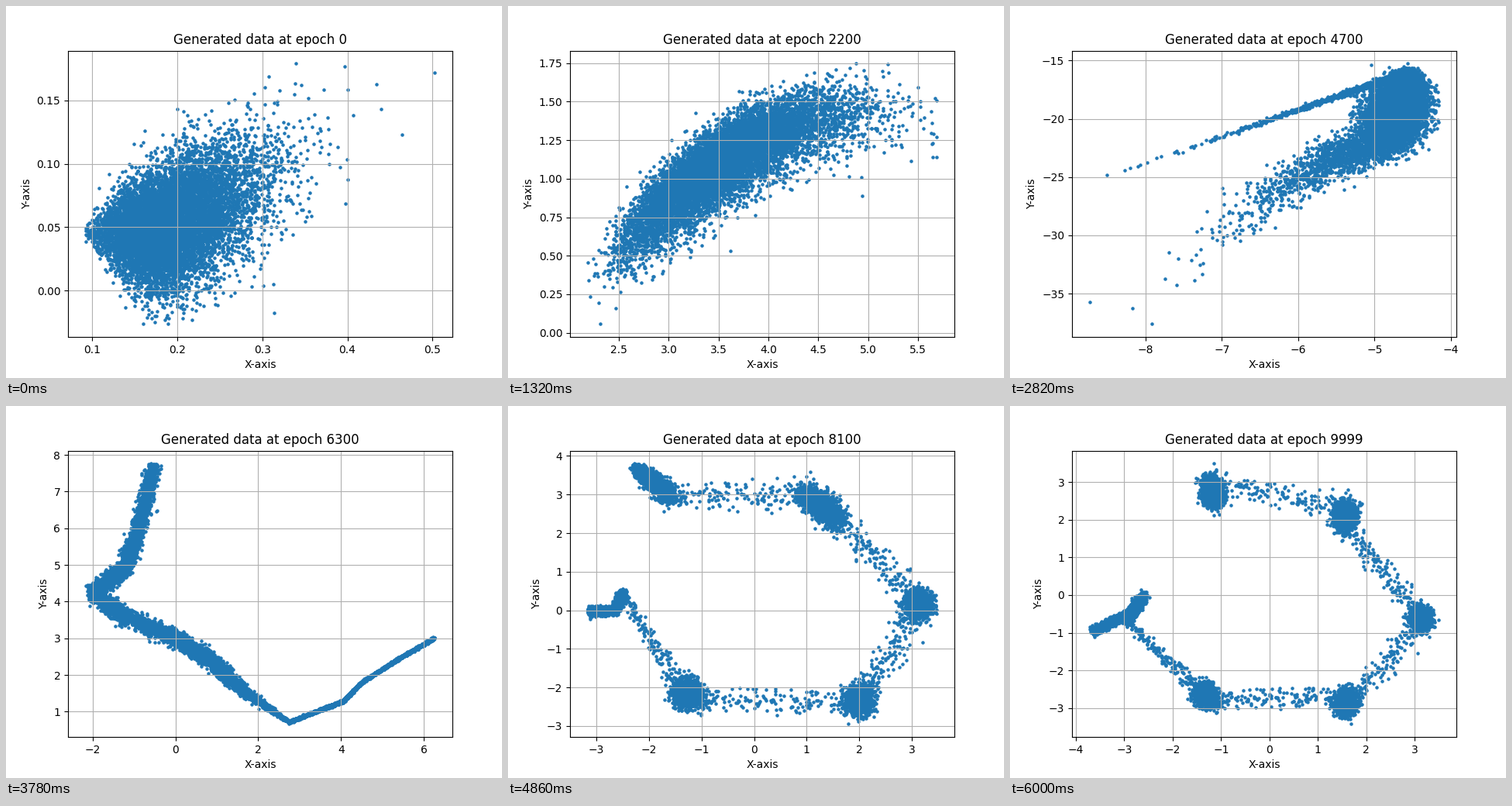
A matplotlib script for the animation above (6060 ms loop, 640 by 480 pixels).

```python
import numpy as np
import matplotlib.pyplot as plt
from matplotlib.animation import FuncAnimation

FRAMES = 101
COUNT = 10000

# Every point keeps its place along the shape (share, rank) and its jitter.
rng = np.random.default_rng(7)
share = (np.arange(COUNT) + 0.5) / COUNT
rank = np.sort(rng.normal(size=COUNT))
jx, jy = rng.normal(size=(2, COUNT))


def fit(x, y, x_range, y_range):
    """Fold stray points back so the data spans exactly the given ranges."""
    pts = np.column_stack([x, y])
    for col, (lo, hi) in zip(pts.T, (x_range, y_range)):
        col[:] = hi - abs(hi - (lo + abs(col - lo)))
        col[col.argmin()], col[col.argmax()] = lo, hi
    return pts


def blob():
    x = 0.189 * np.exp(0.235 * rank)
    spread = 0.028 * (1 - np.exp(-np.maximum(x - 0.09, 0.005) / 0.05))
    y = 0.046 + 0.32 * np.maximum(x - 0.18, 0) + spread * jy
    return fit(x + 0.005 * jx, y, (0.0923, 0.5028), (-0.0264, 0.179))


def streak():
    x = 6.8 + 0.62 * rank + 0.045 * rank ** 2
    y = 5.05 + 0.75 * (x - 6.95) + (0.045 + 0.03 * (x - 5.15)) * jy
    return fit(x, y, (5.149, 9.789), (3.568, 7.048))


def banana():
    x = 0.55 + 0.47 * rank + 0.05 * rank ** 2
    sag = jy - 0.06 * (jy ** 2 - 1)
    y = -2.38 - 0.3 * (x - 0.55) ** 2 + (0.17 - 0.035 * x) * sag
    return fit(x + 0.05 * jx, y, (-0.523, 2.483), (-4.132, -1.884))


def wedge():
    upper = 1.6 * np.maximum(-rank - 1.2, 0)
    lower = 1.2 * np.maximum(rank - 1, 0)
    body = (np.clip(rank, -1.2, 1) + 1.2) / 2.2
    spread = np.clip(rank + 1.4, 0.12, 1)
    x = -4.55 - 0.3 * body - upper - lower + 0.19 * spread * jx
    y = (-15.9 - 5.9 * body - 2.28 * upper - 2 * lower - 0.85 * lower ** 2
         + 0.75 * spread * jy)
    return fit(x, y, (-8.736, -4.157), (-37.62, -15.26))


def chain(corners, link, ends, widths, x_range, y_range):
    """Strokes joined by links; a link holds `link` times a stroke's points."""
    cx, cy = np.array(corners).T
    steps = [1 if k % 2 == 0 else link for k in range(len(corners) - 1)]
    at = np.concatenate([[0], np.cumsum(steps)]) / sum(steps)
    x, y = np.interp(share, at, cx), np.interp(share, at, cy)
    spread = np.interp(x, ends, widths)
    return fit(x + 0.75 * spread * jx, y + spread * jy, x_range, y_range)


hook = chain([(-.53, 7.7), (-.95, 5.8), (-1.25, 4.9), (-2, 4.25),
              (-1.3, 3.65), (0, 3), (.85, 2.4), (1.6, 1.6), (2.75, .72),
              (3.5, 1.05), (4.05, 1.28), (4.5, 1.8), (5.4, 2.45), (6.25, 3)],
             1, (1, 2.7), (.11, .015), (-2.178, 6.272), (.664, 7.76))

bent = chain([(-2.25, 3.7), (-1.6, 2.95), (1, 3.05), (1.55, 2.4),
              (3.1, .25), (3.15, .1), (2.05, -2.2), (1.95, -2.45),
              (-1.15, -2.25), (-1.4, -2.05), (-2.5, .45), (-2.65, 0),
              (-2.72, 0), (-3.12, -.03)],
             .12, (-2.5, -1.3), (.05, .17), (-3.17, 3.479), (-2.948, 3.8))

ring = chain([(-1.15, 2.5), (-1.22, 3), (1.62, 2.35), (1.5, 1.9),
              (3.1, -.5), (3.15, -.7), (1.55, -3), (1.6, -2.7),
              (-1.2, -2.75), (-1.45, -2.55), (-2.95, -.7), (-2.62, -.03),
              (-2.95, -.5), (-3.65, -.97)],
             .12, (-3, -1.2), (.05, .14), (-3.72, 3.505), (-3.42, 3.485))

# Frame, shape, and easing power on the way to the next one.
POSES = [(0, blob(), 1.5), (11, streak(), 1), (32, banana(), 1),
         (47, wedge(), 1), (63, hook, 0.4), (81, bent, 1), (100, ring, 1)]


def points(i):
    for (a, start, power), (b, end, _) in zip(POSES, POSES[1:]):
        if i <= b:
            u = ((i - a) / (b - a)) ** power
            return start + (end - start) * u


fig, ax = plt.subplots(figsize=(6.4, 4.8), dpi=100)
dots = ax.scatter(np.zeros(COUNT), np.zeros(COUNT), s=5)
ax.set_xlabel("X-axis")
ax.set_ylabel("Y-axis")
ax.grid(True)


def update(i):
    pts = points(i)
    lo, hi = pts.min(axis=0), pts.max(axis=0)
    pad = 0.05 * (hi - lo)
    dots.set_offsets(pts)
    ax.set_xlim(lo[0] - pad[0], hi[0] + pad[0])
    ax.set_ylim(lo[1] - pad[1], hi[1] + pad[1])
    ax.set_title(f"Generated data at epoch {min(100 * i, 9999)}")
    return [dots]


anim = FuncAnimation(fig, update, frames=FRAMES, interval=60,
                     init_func=lambda: update(0), repeat=True, repeat_delay=0)
plt.show()
```
